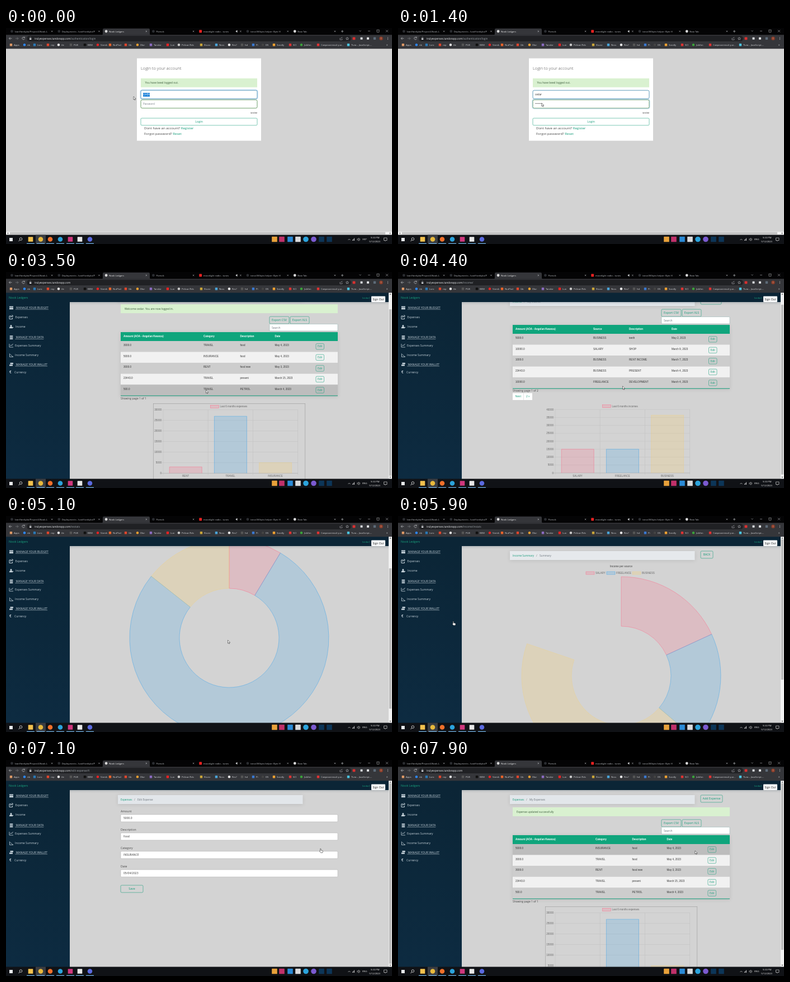
An HTML page for the animation above (8 s loop, 690x388 px).

```html
<!DOCTYPE html>
<html lang="en">
<head>
<meta charset="utf-8">
<title>Expense tracker demo</title>
<style>
html, body { margin: 0; width: 100%; height: 100%; overflow: hidden; background: #d3d3d3; }
svg { display: block; width: 690px; height: 388px; font-family: "Open Sans", "Noto Sans", sans-serif; }
text { white-space: pre; }
.a { font-family: "Liberation Sans", Arial, sans-serif; }
.b { font-weight: bold; }
.m { text-anchor: middle; }
.e { text-anchor: end; }
.lift { filter: drop-shadow(0 1px 3px rgba(0, 0, 0, .1)); }
</style>
</head>
<body>
<svg viewBox="0 0 690 388">
  <defs>
    <linearGradient id="side" x2="0" y2="1"><stop stop-color="#0b2536"/><stop offset="1" stop-color="#0d2b41"/></linearGradient>
    <linearGradient id="shade" x2="0" y2="1"><stop stop-color="#0b2536" stop-opacity=".14"/><stop offset="1" stop-color="#0b2536" stop-opacity="0"/></linearGradient>
  </defs>
  <g id="view"></g>
  <g id="frame"></g>
  <g id="live"></g>
</svg>
<script>
const LOOP = 8000, STEP = 100;
const APP = 'Nook Ledgers', USER = 'cedar', HOST = 'trulyexpenses.tandorapp.com';
const TEAL = '#129a78', INK = '#333', PALE = '#c6d2da';
const PINK = '#ff6384', BLUE = '#36a2eb', SAND = '#ffce56';
const $ = id => document.getElementById(id);

// Drawing helpers; text is placed by its vertical centre
const text = (x, y, s, size, fill, cls = '', more = '') =>
  `<text x="${x}" y="${y + size * .36}" font-size="${size}" fill="${fill}" class="${cls}" ${more}>${s}</text>`;
const box = (x, y, w, h, fill, more = '') =>
  `<rect x="${x}" y="${y}" width="${w}" height="${h}" fill="${fill}" ${more}/>`;
const dot = (x, y, r, fill, more = '') => `<circle cx="${x}" cy="${y}" r="${r}" fill="${fill}" ${more}/>`;
const line = (d, c, w = .6, fill = 'none') => `<path d="${d}" stroke="${c}" stroke-width="${w}" fill="${fill}"/>`;
const button = (x, y, w, h, s, size = 5.3) =>
  box(x, y, w, h, 'none', `rx="1.8" stroke="${TEAL}" stroke-width=".55"`) +
  text(x + w / 2, y + h / 2, s, size, TEAL, 'm');
const edge = c => c === SAND ? .25 : .45;
const swatch = (x, y, c) => box(x, y, 15, 5, c, `fill-opacity=".2" stroke="${c}" stroke-width="${edge(c)}"`);

// Motion helpers
const clamp = v => Math.min(1, Math.max(0, v));
const outQuart = p => 1 - (1 - clamp(p)) ** 4;
function track(keys, t) {
  let a = keys[0];
  for (const b of keys) {
    if (t < b[0]) {
      const p = (t - a[0]) / (b[0] - a[0]), e = p * p * (3 - 2 * p);
      return a.slice(1).map((v, i) => v + (b[i + 1] - v) * e);
    }
    a = b;
  }
  return a.slice(1);
}

const MOUSE = [
  [0, 228, 123], [1200, 228, 123], [1800, 339, 169], [2900, 339, 169], [3200, 357.5, 212],
  [3500, 357.5, 212], [3800, 26, 97], [3950, 26, 97], [4300, 401.5, 205], [4500, 401.5, 205],
  [4700, 40, 131], [4800, 40, 131], [5050, 396.5, 223], [5400, 396.5, 223], [5700, 38, 148],
  [5800, 38, 148], [6100, 268, 306], [6200, 268, 306], [6400, 177, 164.5], [6600, 26, 80],
  [6700, 26, 80], [7000, 561, 159], [7100, 561, 159], [7400, 224, 231], [7500, 224, 231], [7900, 531, 163]
];
const HANDS = [[1700, 2900], [3700, 4000], [4600, 4900], [5600, 5900], [6500, 6800], [6900, 7100], [7400, 7500]];
const isHand = t => HANDS.some(([a, b]) => t >= a && t <= b);

// Data
const spend = [
  ['3000.0', 'TRAVEL', 'food', 'May 4, 2023'], ['5000.0', 'INSURANCE', 'food', 'May 4, 2023'],
  ['3000.0', 'RENT', 'food new', 'May 3, 2023'], ['23443.0', 'TRAVEL', 'present', 'March 15, 2023'],
  ['500.0', 'TRAVEL', 'PETROL', 'March 4, 2023']
];
const earn = [
  ['5000.0', 'BUSINESS', 'teeth', 'May 2, 2023'], ['10000.0', 'SALARY', 'SHOP', 'March 9, 2023'],
  ['1000.0', 'BUSINESS', 'RENT INCOME', 'March 7, 2023'], ['23443.0', 'BUSINESS', 'PRESENT', 'March 4, 2023'],
  ['10000.0', 'FREELANCE', 'DEVELOPMENT', 'March 4, 2023']
];
const spendSum = [['RENT', 3000, PINK], ['TRAVEL', 26943, BLUE], ['INSURANCE', 5000, SAND]];
const earnSum = [['SALARY', 15000, PINK], ['FREELANCE', 15000, BLUE], ['BUSINESS', 36443, SAND]];

function crumbs(root, here, x, fill) {
  return box(200, 63, 330.5, 16, fill, 'class="lift"') + text(205, 71.3, root, 4.65, TEAL) +
    text(x, 71.3, '/', 4.65, '#777') + text(x + 6, 71.3, here, 4.65, '#6c757d');
}

function table(heads, cols, rows, editX, dy, mouseY = -1) {
  let s = button(471, 107 + dy, 35, 13, 'Export CSV') + button(508, 107 + dy, 34, 13, 'Export XLS') +
    box(471, 120.5 + dy, 122, 12.5, '#fff', 'rx="1.2" stroke="#8aa" stroke-width=".5"') +
    text(475, 127 + dy, 'Search', 4.95, '#6c757d') +
    box(205, 135 + dy, 388, 115, '#d3d3d3', 'class="lift"') + box(205, 135 + dy, 388, 16, '#0fa57c');
  heads.forEach((h, i) => s += text(cols[i], 142.4 + dy, h, 4.55, '#fff', 'a b'));
  rows.forEach((row, r) => {
    const y = 151 + dy + r * 19.6;
    s += box(205, y, 388, 19.6, r % 2 ? '#f1f1f1' : '#cdcdcd');
    if (mouseY >= y && mouseY < y + 19.6) s += box(205, y, 388, 19.6, '#000', 'opacity=".08"');
    row.forEach((v, i) => s += text(cols[i], y + 7.5, v, 4.6, INK, 'a'));
    s += button(editX, y + 4.6, 14.5, 10.4, 'Edit', 4.7);
  });
  return s + box(205, 248.8 + dy, 388, 1, TEAL);
}

function bars(legend, sums, y0, max, p) {
  const y1 = y0 + 114;
  let s = swatch(365.5, y0 - 8.3, PINK) + text(382.5, y0 - 5.8, legend, 4.5, '#666', 'a');
  for (let v = 0; v <= max; v += 5000) {
    const y = y1 - 114 * v / max;
    s += line(`M278 ${y}H522`, v ? '#bdbdbd' : '#999', .45) + text(278, y, v, 4.6, '#666', 'a e');
  }
  sums.forEach(([name, v, c], i) => {
    const x = 281 + 80.2 * i, h = 114 * v / max * p;
    s += line(`M${x} ${y0}V${y1 + 3}`, '#bdbdbd', .45) + text(x + 40, y1 + 5.3, name, 4.5, '#666', 'a m');
    if (h > 0) s += box(x + 11.2, y1 - h, 58, h, c, 'fill-opacity=".2"') +
      line(`M${x + 11.2} ${y1}v${-h}h58v${h}`, c, edge(c));
  });
  return s + line(`M521.6 ${y0}V${y1 + 3}`, '#bdbdbd', .45);
}

function donut(title, sums, legendX, p) {
  const total = sums.reduce((n, d) => n + d[1], 0), at = (r, a) => `${399 + r * Math.sin(a)} ${287 - r * Math.cos(a)}`;
  let s = text(399, 90.6, title, 4.5, '#666', 'a b m'), a = 0;
  sums.forEach(([name, v, c], i) => {
    const b = a + v / total * p * 2 * Math.PI * .99999, big = +(b - a > Math.PI);
    if (p > 0) s += `<path d="M${at(178, a)}A178 178 0 ${big} 1 ${at(178, b)}L${at(89, b)}A89 89 0 ${big} 0 ${at(89, a)}Z"
      fill="${c}" fill-opacity=".2" stroke="${c}" stroke-width="${edge(c)}"/>`;
    s += swatch(legendX[i], 100, c) + text(legendX[i] + 17, 102.6, name, 4.5, '#666', 'a');
    a = b;
  });
  return s;
}

// Pages
function login(t) {
  const typed = USER.slice(0, Math.floor((t - 200) / 100)), inPass = t >= 900;
  const field = (y, on, c) => box(241, y, 208, 15, '#fff', `rx="2.4" stroke="${c}" stroke-width=".9"`) +
    (on ? box(240, y - 1, 210, 17, 'none', 'rx="3.2" stroke="#4a9be0" stroke-opacity=".4" stroke-width="1"') : '');
  const pass = '•'.repeat(Math.max(0, Math.min(8, Math.floor((t - 900) / 70))));
  return box(0, 37, 690, 335, '#d3d3d3') + box(234, 54.5, 222, 148, '#fff') +
    text(241, 72.6, 'Login to your account', 7.45, '#444', '', 'font-weight="300"') +
    box(241, 90.5, 208, 16, '#d9f1d0') + text(248.5, 98.6, 'You have beed logged out.', 4.85, '#3c5c3c') +
    field(112, !inPass, '#4b8fb0') + field(129, inPass, '#5d9458') +
    (t < 300 ? box(245, 116.6, 12, 6.6, '#0a78d7') + text(245, 119.8, 'сувфк', 4.4, '#fff')
      : text(245, 119.8, typed, 4.7, INK)) +
    (pass ? text(245, 136.8, pass, 4.7, INK) : text(245, 136.8, 'Password', 4.65, '#7b838a')) +
    text(449, 153, 'SHOW', 4, INK, 'e') + button(241, 162, 208, 12.8, 'Login', 5.4) +
    text(247, 180, `Dont have an account? <tspan fill="${TEAL}">Register</tspan>`, 6.05, '#444') +
    text(247, 190, `Forgot password? <tspan fill="${TEAL}">Reset</tspan>`, 6.05, '#444') +
    box(0, 366, 690, 5.5, '#f1f1f1') + box(7, 366.7, 671, 4, '#c1c1c1') +
    line('M4 367.5l-1.5 1.2l1.5 1.2zM686 367.5l1.5 1.2l-1.5 1.2z', '#555', .3, '#555');
}

function expenses(note, rows, p, mouseY) {
  const dy = note ? 0 : -22;
  return crumbs('Expenses', 'My Expenses', 229, '#e2e6ea') + button(541, 63, 39, 13, 'Add Expense') +
    (note ? box(205, 85, 388, 16, '#d9f1d0') + text(212, 93.2, note, 4.8, '#3c5c3c') : '') +
    table(['Amount (AOA - Angolan Kwanza)', 'Category', 'Description', 'Date'],
      [210, 353, 418.5, 480.5], rows, 554, dy, mouseY) +
    text(205, 253.8 + dy, 'Showing page 1 of 1', 4.9, '#444') +
    box(263.3, 263.5 + dy, 271.5, 140, 'none', 'stroke="#999" stroke-width=".6"') +
    bars('Last 6 months expenses', spendSum, 274.5 + dy, 30000, p);
}

function income(p) {
  return crumbs('Income', 'My Income', 225, '#e2e6ea') + button(541, 63, 37, 13, 'Add Income') +
    table(['Amount (AOA - Angolan Kwanza)', 'Source', 'Description', 'Date'],
      [210, 349, 413, 489], earn, 555.5, -22) +
    text(205, 231.5, 'Showing page 1 of 2', 4.9, '#444') +
    box(205, 235.5, 35, 12.5, '#fff') + line('M224.5 235.5v12.5', '#ccc', .5) +
    text(209.5, 241.7, 'Next', 4.9, TEAL) + text(229, 241.7, '2 »', 4.9, TEAL) +
    bars('Last 6 months incomes', earnSum, 265, 40000, p);
}

const spendStats = p => crumbs('Expenses Summary', 'Summary', 251, '#e6e9ec') + button(541, 63, 22, 13, 'BACK', 5) +
  donut('Expenses per category', spendSum, [338, 370, 407], p);

function earnStats(p, tip) {
  return crumbs('Income Summary', 'Summary', 247, '#e6e9ec') + button(541, 63, 22, 13, 'BACK', 5) +
    donut('Income per source', earnSum, [336, 373, 419], p) +
    (tip ? `<g opacity=".8">${box(270, 302.6, 45.5, 8.6, '#000', 'rx="2"')}<path d="M268 306.9l2.2-2v4z"/></g>` +
      box(272.3, 304.9, 4, 4, '#e8d9a8', 'stroke="#fff" stroke-width=".5"') +
      text(277.5, 306.8, 'BUSINESS: 36443', 4.3, '#fff', 'a') : '');
}

function editForm() {
  const rows = [['Amount', '5000.0'], ['Description', 'food'], ['Category', 'INSURANCE'], ['Date', '05/04/2023']];
  return crumbs('Expenses', 'Edit Expense', 229, '#e2e6ea') + rows.map(([k, v], i) => {
    const y = 92 + i * 33;
    return text(205, y, k, 5.2, '#444') +
      box(205, y + 6, 388, 13, '#fff', 'rx="1.5" stroke="#aaa" stroke-width=".5"') + text(210, y + 12.5, v, 5, INK);
  }).join('') + button(205, 225, 40, 13, 'Save', 5.3);
}

// start, path, thumb length, scroll keys, body
const none = [[0, 0]];
const PAGES = [
  [0, '/authentication/login', 0, none, null],
  [2500, '', 299, [[3000, 0], [3300, 27]], (t, y) => expenses(`Welcome ${USER}. You are now logged in.`, spend, outQuart((t - 2700) / 400), y)],
  [3900, '/income/', 305, [[4150, 0], [4400, 18]], t => income(outQuart((t - 3900) / 400))],
  [4800, '/exstats', 252, [[4850, 0], [5050, 68]], t => spendStats(outQuart((t - 4800) / 300))],
  [5800, '/income/instats', 252, none, t => earnStats(outQuart((t - 5800) / 300), t >= 6100)],
  [6700, '', 310, none, (t, y) => expenses('', spend, outQuart((t - 6700) / 300), y)],
  [7100, '/edit-expense/4', 324, none, editForm],
  [7500, '', 299, none, (t, y) => expenses('Expense updated successfully', [spend[1], spend[0], ...spend.slice(2)], outQuart((t - 7500) / 300), y)]
];

// Fixed header and sidebar
const NAV = [
  [64, 16.8, ' MANAGE YOUR BUDGET', 1], [81.3, 16.5, 'Expenses'], [98.3, 17, 'Income'], [117.6, 16.2, ' MANAGE YOUR DATA', 1],
  [132, 16, 'Expenses Summary'], [149.3, 16, 'Income Summary'], [166, 16.4, ' MANAGE YOUR WALLET', 1], [180, 15, 'Currency']
];
const shell = box(114, 54, 570, 5, 'url(#shade)') + box(0, 54, 114, 318, 'url(#side)') + box(0, 37, 684, 17, '#0b2536') +
  text(5, 45.8, APP, 5.35, '#1aa57e') + text(650.5, 46, `(${USER})`, 4.3, '#1aa57e', 'e') +
  box(653, 43.5, 25, 10.5, '#f8f9fa', 'rx="1"') + text(665.5, 48.8, 'Sign Out', 5, '#222', 'm') +
  NAV.map(([y, x, s, head]) => text(x, y, s, 5.12, PALE, '', head ? 'text-decoration="underline"' : '')).join('') +
  box(6, 61.5, 7, 2, PALE) + box(6, 64.2, 7, 3, PALE, 'rx=".5"') +
  line('M9 79H6v5.5h5.5V82M8 82q0-3 4-3M10.5 77.2l2.2 1.8l-2.2 1.8', PALE, 1) +
  dot(9, 96.5, 1.5, PALE) + line('M6 101q0-3 3-3t3 3z', PALE, .3, PALE) + line('M10.5 99.5h3', PALE, .8) +
  [115, 117.5, 120].map(y => box(6.5, y - .8, 6, 1.8, PALE, 'rx=".7"')).join('') +
  line('M6 129v6h7M7.5 133l1.5-2l1.5 1l2-3', PALE, .8) + line('M6.5 146.5v6h6.5M7.5 148l4 3.5h1', PALE, .8) +
  box(7.5, 163, 5.5, 2.6, PALE, 'rx=".6"') + box(6, 166.2, 6, 2.6, PALE, 'rx=".6"') + text(6, 180, '€', 6.2, PALE, 'b');

// Browser window and taskbar
const TABS = [
  ['IvanHordiyko/Project4-Nook-L', '#2b2d31'], ['Deployments - IvanHordiyko/P', '#2b2d31'], [APP, '#d8d8d8'],
  ['Pomvik', '#2b2d31'], ['moonlight radio - tunes', '#e22'], ['tarvo38/byte-helper: Byte H', '#2b2d31'], ['New Tab', '#d8d8d8']
];
const MARKS = [
  [14, 'Apps', '#d96'], [38, 'nb', '#2d88ff'], [56, 'Lvro', '#2a78b5'], [80, 'rep', '#e0452c'], [99, 'tle', '#e8e8e8'],
  [121, 'PUK', '#555'], [146, 'BEM', '#111'], [169, 'Vomik', '#e22'], [191, 'NutPod', '#e8632a'], [219, 'Gb', '#e0452c'],
  [240, 'Dlar', '#f0a030'], [264, 'Tandor', '#8a6bc0'], [294, 'Lun', '#e22'], [314, 'PelicanTbls', '#ccc'], [354, 'Ktune', '#c9a53a'],
  [381, 'Ncss', '#4aa3d8'], [404, 'Res?', '#eee'], [427, 'hd', '#555'], [447, 'Pi', '#3a78d0'], [464, 'DS', '#444'],
  [484, 'Sondly', '#f0a030'], [513, 'SCI', '#d33'], [533, 'Jobfen', '#3aa53a'], [563, 'Современный уче…', '#d33'], [617, 'Tivra – JavaScript-…', '#4ac3e0']
];
const APPS = [
  [44, '#f2c14e', 1], [62, '#e8b93c'], [79, '#f0702a'], [97, '#2ba3dc'], [115, '#d0387e', 1], [132, '#e8e8e8', 1], [150, '#5b6ae0'],
  [480, '#e8a13a', 1], [493, '#c0306a', 1], [508, '#2a8ad6', 1], [522, '#d9dadc', 1], [536, '#2ba3dc'], [550, '#7b5ad0'], [564, '#0c3558', 1], [578, '#0c3558', 1]
];
const mark = (x, y, r, c, square) => square ? box(x - r, y - r, 2 * r, 2 * r, c, 'rx=".6"') : dot(x, y, r, c);
const LIGHT = '#d5d7da';

$('frame').innerHTML = box(0, 0, 690, 13, '#040405') +
  '<path d="M171 12.5q2 0 2-2V3q0-2 2-2H255q2 0 2 2v7.5q0 2 2 2z" fill="#35363a"/>' +
  box(0, 12.3, 690, 25, '#35363a') + box(37, 14, 580, 10, '#202124', 'rx="5"') +
  TABS.map(([s, c], i) => {
    const x = 10.5 + 84.3 * i;
    return mark(x, 6, 2.4, c, i === 4) + text(x + 5, 6.2, s, 4.2, i === 2 ? '#f1f1f1' : '#b9bcc0') +
      line(`M${x + 70.5} 4.8l2.4 2.4m0-2.4l-2.4 2.4`, LIGHT, .5);
  }).join('') +
  line('M411 5.2h1l1.3-1.2v4l-1.3-1.2h-1z', LIGHT, .4, LIGHT) + line('M599 6h4.4M601.2 3.8v4.4', LIGHT) +
  line('M631.5 4.5l1.7 1.6l1.7-1.6M647 5.5h4M679 3.5l4 4m0-4l-4 4', LIGHT, .5) +
  box(663, 3.5, 4, 4, 'none', `stroke="${LIGHT}" stroke-width=".5"`) +
  line('M10.5 18.8h-5m2.2-2.2l-2.2 2.2l2.2 2.2', LIGHT) + line('M17 18.8h5m-2.2-2.2l2.2 2.2l-2.2 2.2', '#85888c') +
  line('M33 17.2a2.3 2.3 0 1 0 .3 2.2M33.3 15.6v2h-2', LIGHT) +
  box(42, 18.4, 3.4, 2.6, LIGHT, 'rx=".4"') + line('M42.7 18.4v-1a1 1 0 0 1 2 0v1', LIGHT, .5) +
  line('M597 18v3.2h4v-2M598.5 19q.5-2.2 3-2.2M610 16.5l.8 1.6l1.7.2l-1.3 1.2l.4 1.7l-1.6-.9l-1.6.9l.4-1.7l-1.3-1.2l1.7-.2z', LIGHT, .5) +
  mark(622, 18.8, 2.4, '#d93030', 1) + mark(635.5, 18.8, 2, LIGHT, 1) + mark(647, 18.8, 2, '#e4e6e8', 1) +
  mark(659, 18.8, 2.2, '#5d6b78', 1) + dot(670.5, 18.8, 3.2, '#8f3f2a') + text(670.5, 18.8, 'I', 3.6, '#fff', 'm') +
  [17, 18.8, 20.6].map(y => dot(682.5, y, .5, LIGHT)).join('') +
  MARKS.map(([x, s, c], i) => mark(x - 5, 30.3, 2.2, c, i % 3 !== 1) + text(x, 30.3, s, 4.2, LIGHT)).join('') +
  text(680, 30, '»', 5, LIGHT) +
  box(0, 371.5, 690, 16.5, '#101216') + box(53, 371.5, 18, 16.5, '#3a3d42') +
  box(6, 377, 6, 6, '#e6e8ea') + dot(26.5, 379, 2.3, 'none', 'stroke="#eee" stroke-width=".8"') + line('M24.8 380.8l-2.3 2.3', '#eee', .9) +
  APPS.map(([x, c, sq]) => mark(x, 379.5, x > 400 ? 4.8 : 4.3, c, sq) + (x < 200 ? box(x - 7, 386.6, 14, 1.2, '#76b9ed') : '')).join('') +
  line('M611.5 381l2-2l2 2', '#eee') + line('M619.5 382v-1.5M621 382v-3M622.5 382v-4.5', '#eee', .8) +
  line('M628 378.8h1.2l1.6-1.5v5l-1.6-1.5h-1.2zM632 378q1.3 1.8 0 3.6', '#eee', .5) +
  text(667.5, 376.6, '9:33 PM', 4.2, '#eee', 'e') + text(669, 383, '5/12/2023', 4.2, '#eee', 'e') +
  line('M675.5 377h5.5v4.5h-2l-1.2 1.4v-1.4h-2.3z', '#eee', .6);

function pointer(t, x, y) {
  const d = isHand(t)
    ? 'M1 0q1 0 1 1v2l2.6.7q.9.3.8 1.3l-.5 2.6h-3.4l-2-2.6q.2-1 1.2-.4V1q0-1 .3-1z'
    : 'M0 0v5.7l1.3-1.2l.9 2l1-.4l-.9-2h1.9z';
  return `<path transform="translate(${x} ${y})" d="${d}" fill="#fff" stroke="#111" stroke-width=".5"/>`;
}

function draw(t) {
  const [, path, thumb, keys, body] = PAGES.filter(p => p[0] <= t).pop();
  const [x, y] = track(MOUSE, t);
  if (!body) $('view').innerHTML = login(t);
  else {
    const [scroll] = track(keys, t), hoverY = isHand(t) || x < 205 ? -1 : y + scroll;
    $('view').innerHTML = box(0, 37, 690, 335, '#d3d3d3') +
      `<g transform="translate(0 ${-scroll})">${body(t, hoverY)}</g>` + shell +
      box(684, 37, 6, 335, '#f1f1f1') + box(684.8, 42 + scroll * (thumb < 260 ? .765 : .93), 4.4, thumb, '#bcbcbc') +
      line('M685.7 40.5l1.3-1.5l1.3 1.5zM685.7 368l1.3 1.5l1.3-1.5z', '#555', .3, '#555');
  }
  $('live').innerHTML = text(51, 18.9, `${HOST}<tspan fill="#9aa0a6">${path}</tspan>`, 4.62, '#e8eaed') +
    text(637, 379.8, t < 100 ? 'УКР' : 'ENG', 4.2, '#eee') + pointer(t, x, y);
}

const start = performance.now();
let last = -1;
function tick() {
  const t = Math.floor((performance.now() - start) % LOOP / STEP) * STEP;
  if (t !== last) draw(last = t);
  requestAnimationFrame(tick);
}
tick();
</script>
</body>
</html>
```
